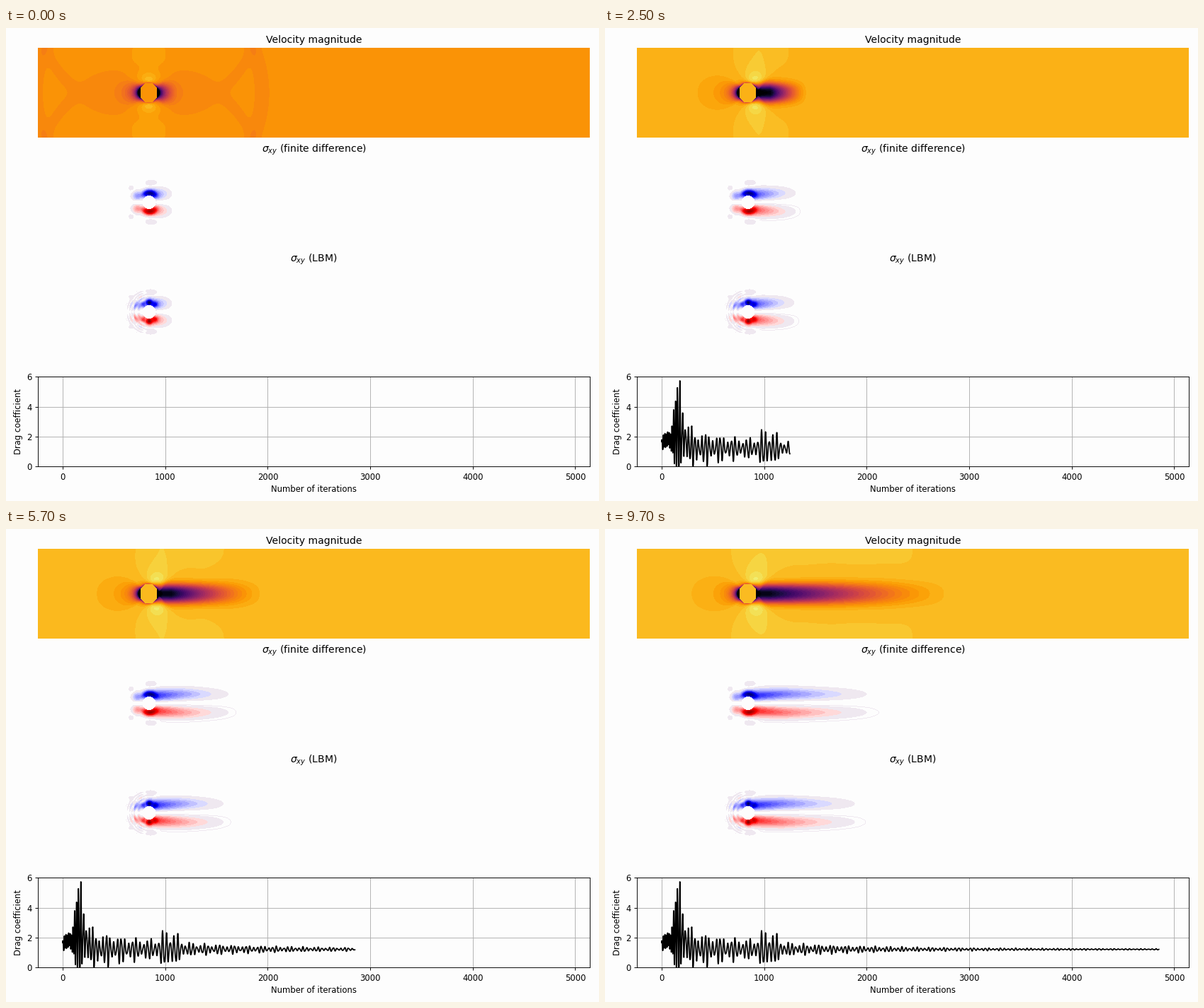
Recreate the animation shown at these times as a matplotlib script. Size 837 by 669 pixels, loop 9.8 s.

```python
import numpy as np
import matplotlib.pyplot as plt
from matplotlib.animation import FuncAnimation

W, H, DPI = 837, 669, 83.7
FRAMES, STEP = 98, 50
PAPER = "#fdfdfd"
LEFT, WIDTH, HEIGHT = 45, 779, 127
TOPS = (28, 183, 338)
CX, R = 201.5, 12.5
BAND = 0.025

fig = plt.figure(figsize=((W + 1e-4) / DPI, (H + 1e-4) / DPI), dpi=DPI, facecolor=PAPER)


def add_axes(left, top, width, height):
    return fig.add_axes([left / W, 1 - (top + height) / H, width / W, height / H])


def panel(top, title):
    ax = add_axes(LEFT, top, WIDTH, HEIGHT)
    ax.set_title(title)
    ax.axis("off")


def place(data, left, top, **kw):
    """Show an array pixel for pixel."""
    return fig.figimage(data, xo=left, yo=H - top - data.shape[0], origin="upper", **kw)


def ramp(x):
    return 1 / (1 + np.exp(-np.clip(x, -40, 40)))


def bump(x, centre, width):
    return np.exp(-((x - centre) / width) ** 2)


# Velocity: only the lower half is computed, the upper one is its mirror.
vx = (np.arange(WIDTH) + LEFT + 0.5 - CX)[None, :].astype(np.float32)
vy = np.arange(64)[:, None].astype(np.float32)
vr = np.hypot(vx, vy)
ahead = np.clip(vx, 0, None)
solid = (np.abs(vx) <= 11.5) & (vy <= 13) & (np.abs(vx) + vy <= 18)
nose = np.clip(-vx / np.maximum(vr, 1), 0, 1) ** 2
wall = 0.75 * np.exp(-np.clip(vr - 12, 0, None) / (1.8 + 2 * nose))
spread = 11 + 4.5 * (1 - np.exp(-ahead / 100))
wake_shape = np.exp(-(vy / spread) ** 2.4) * ramp((vx - 6) / 2)


def dipole(x):
    """Potential flow past a cylinder and its two nearest periodic copies."""
    total = 0
    for n in (-1, 0, 1):
        y2 = (vy - HEIGHT * n) ** 2
        total = total + R * R * (y2 - x * x) / np.maximum(x * x + y2, 60) ** 2
    return total


slow = 0.7 * np.minimum(dipole(vx), 0)


def pulse(it):
    """Start-up sound ring, also from the periodic copies."""
    radius = 160 + 1.5 * it
    total = 0
    for n in range(-3, 4):
        d = np.hypot(vx, vy - HEIGHT * n)
        total = total + (0.026 if n == 0 else 0.012) * bump(d, radius, 9)
    return total / (1 + it / 120)


def murmur(it):
    amp = 0.0055 * (1 - np.exp(-it / 150)) * np.exp(-it / 3000)
    amp *= abs(np.cos(np.pi * it / 3500))
    total = 0
    for k in range(4):
        length, mode = 150 - 25 * k, k % 3
        total = total + (np.cos(2 * np.pi * (vx - 1.5 * it) / length + 2 * k)
                         * np.cos(2 * np.pi * mode * vy / HEIGHT))
    return amp * total


def velocity(it):
    base = 0.848 - 0.048 * np.exp(-it / 1600) - 0.035 * np.exp(-it / 250)
    tip = 42 + 0.03 * it + 4.6e-6 * it ** 2
    edge = 25 + 0.01 * it + 6.7e-6 * it ** 2
    grow = 1 - np.exp(-it / 500)

    side = (0.22 + 0.14 * grow) * np.maximum(dipole(vx - 12 * grow), 0)
    top = 0.98 - base
    p = top * np.tanh(side / top) - wall
    p = p + slow * np.where(vx > 0, np.exp(-it / 600), 1)

    core = min(32, 0.45 * tip)
    depth = 0.8 * (1 - 0.75 * np.exp(-it / 250))
    p = p - depth * np.clip((tip - vx) / (tip - core), 0, 1) ** 1.6 * wake_shape

    p = p + (0.018 * grow * ramp((edge + 8 - vx) / 9) * ramp((vx - 20) / 15)
             * (1 - np.exp(-(vy / 40) ** 4)))
    if it <= 400:
        p = p - pulse(it)
    p = p + murmur(it)

    shade = np.clip(base + BAND * np.floor(p / BAND + 0.5), 0, 1)
    shade[solid] = base
    return np.concatenate([shade[:0:-1], shade])


# Shear stress, on a window around the cylinder and its wake.
SX0, SX1, SY = -50, 210, 45
sx = (np.arange(SX0, SX1) + 0.5)[None, :]
sy = np.arange(-SY, SY + 1)[:, None].astype(float)
sr = np.hypot(sx, sy)
sa = np.abs(sy)
angle = np.arctan2(sy, sx)
seismic = plt.get_cmap("seismic")
FAINT = (239, 232, 240, 255)
FLOOR, SHEAR_BAND = 0.016, 0.045


def outline(mask):
    inner = mask.copy()
    for axis in (0, 1):
        for shift in (-1, 1):
            inner &= np.roll(mask, shift, axis)
    return mask & ~inner


def stress(it, lattice):
    tip = 32 + 0.0277 * it
    arc = 0.7 * bump(sr, 13, 4.5) * (sa / np.maximum(sr, 1)) ** 3
    if lattice:
        tip *= 1 - 0.1 * it / 4850
        arc = arc * (0.85 + 0.3 * np.cos(8 * angle))
    centre = 10.5 + 2.5 * np.clip(sx / 50, 0, 1)
    tail = (0.5 * np.clip(1 - np.clip(sx, 0, None) / (1.25 * tip), 0, 1) ** 2.1
            * bump(sa, centre, 7.5) * ramp((sx - 2) / 4))
    wing = 0.2 * bump(sx, -17, 6) * bump(sa, 9, 6)
    halo = (0.04 * bump(sx, 3, 9) * bump(sa, 27, 5)
            + 0.03 * bump(sx, -25, 5) * bump(sa, 20, 5))
    s = (tail + arc + wing - halo) * (1 - np.exp(-(sa / 3.5) ** 2))
    if lattice:
        s = s + (0.1 * np.sin(2 * np.pi * sr / 6.5) * bump(sr, 22, 9)
                 * ramp(-(sx + 4) / 4) * (0.6 + 0.4 * np.cos(9 * angle)))
    s = s * np.sign(sy) * (sr > 9.5)

    level = np.floor((np.abs(s) - FLOOR) / SHEAR_BAND)
    tone = np.clip(FLOOR + SHEAR_BAND * (level + 0.3), 0, 1)
    rgba = seismic(0.5 + 0.5 * np.sign(s) * tone, bytes=True)
    rgba[level == 0] = FAINT
    rgba[level < 0] = (253, 253, 253, 255)
    loop = outline((s > 0.005) & (sx > 14)) & (level < 0) & (sx > 16)
    if it > 1200:
        rgba[loop] = FAINT
    return rgba


def drag_history(it):
    """Start-up burst, a second burst near 1040, then a fading ripple."""
    period = 37 - 23 * np.exp(-np.clip(it - 100, 0, None) / 130)
    phase = np.cumsum(2 * np.pi / period)
    size = (1.8 * bump(it, 165, 60) + 1.4 * np.exp(-it / 700)
            + 0.8 * bump(it, 1040, 100) + 0.3 * np.exp(-it / 2200))
    size = size * np.clip(0.25 + (it / 120) ** 3, 0, 1)
    beat = 0.72 + 0.28 * np.cos(2 * np.pi * it / 137 - 1)
    mean = 1.22 + 1.1 * bump(it, 165, 80) + 0.5 * bump(it, 40, 40)
    wave = np.sin(phase) + 0.25 * np.sin(1.7 * phase + 1)
    return np.maximum(mean + size * beat * wave, 0.03)


its = np.arange(FRAMES * STEP)
drag = drag_history(its)

for top, title in zip(TOPS, ("Velocity magnitude",
                             r"$\sigma_{xy}$ (finite difference)",
                             r"$\sigma_{xy}$ (LBM)")):
    panel(top, title)

middle = HEIGHT // 2 - SY
window_left = int(CX - 0.5) + SX0 + 1
vel_im = place(velocity(0), LEFT, TOPS[0], cmap="inferno", vmin=0, vmax=1)
fd_im = place(stress(0, False), window_left, TOPS[1] + middle)
lbm_im = place(stress(0, True), window_left, TOPS[2] + middle)

drag_ax = add_axes(44.6, 493.2, 779.8, 127.2)
drag_ax.set_facecolor(PAPER)
drag_ax.set_xlim(-245, 5145)
drag_ax.set_ylim(0, 6)
drag_ax.set_yticks(range(0, 7, 2))
drag_ax.grid(True)
drag_ax.set_xlabel("Number of iterations")
drag_ax.set_ylabel("Drag coefficient")
line, = drag_ax.plot([], [], color="black", lw=1.5)


def draw(frame):
    it = frame * STEP
    vel_im.set_data(velocity(it))
    fd_im.set_data(stress(it, False))
    lbm_im.set_data(stress(it, True))
    shown = it + 1 if frame else 0
    line.set_data(its[:shown], drag[:shown])
    return vel_im, fd_im, lbm_im, line


anim = FuncAnimation(fig, draw, frames=FRAMES, interval=100, repeat=True, repeat_delay=0)
plt.show()
```
